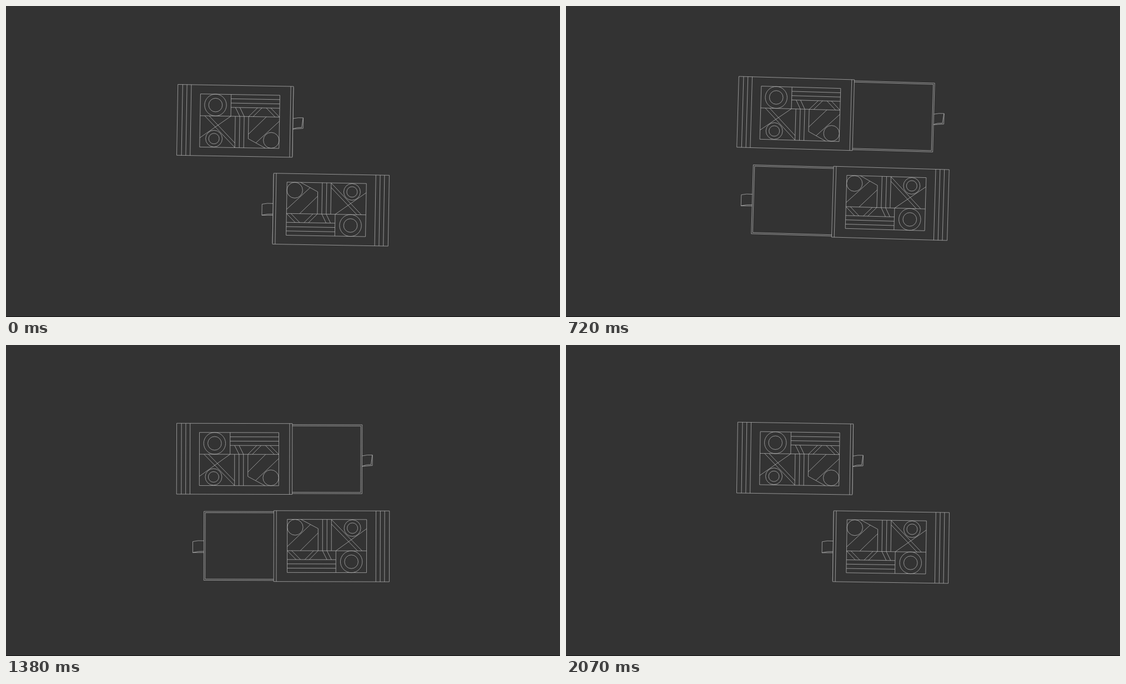
An HTML page with a canvas for the animation above (2100 ms loop, 998 px wide and 561 px high).

```html
<!DOCTYPE html>
<html lang="en">
<head>
<meta charset="utf-8">
<title>Sliding boxes</title>
<style>
  html, body { margin: 0; width: 100%; height: 100%; overflow: hidden; background: #333; }
  canvas { display: block; width: 998px; height: 561px; }
</style>
</head>
<body>
<canvas id="stage" width="998" height="561"></canvas>
<script>
const ctx = document.getElementById('stage').getContext('2d');
const LOOP = 2100, STEP = 30;
const BG = '#333333', INK = '#b6b6b6';
const BOX = { x: -191.8, y: -142.5, w: 208.3, h: 127.8 };
const TRAVEL = 154;

// Turning points of the sway (degrees) and of the float (centre height)
const SWAY = [[0, 1], [230, -0.5], [605, 2.9], [1010, -3.8], [1290, 1.5],
  [1500, -2], [1765, 3.6], [1990, 0.3], [LOOP, 1]];
const FLOAT = [[0, 287.3], [400, 287.9], [920, 268.8], [1440, 284.7], [LOOP, 284.6]];

// Half a cosine between neighbouring turning points
function wave(turns, t) {
  const i = turns.findIndex(turn => turn[0] > t);
  const [t0, a] = turns[i - 1], [t1, b] = turns[i];
  return a + (b - a) * (1 - Math.cos(Math.PI * (t - t0) / (t1 - t0))) / 2;
}

// Cubic ease with handles (x1, 0) and (x2, 1)
function ease(u, x1, x2) {
  if (u <= 0) return 0;
  if (u >= 1) return 1;
  let lo = 0, hi = 1;
  for (let i = 0; i < 24; i++) {
    const s = (lo + hi) / 2, r = 1 - s;
    const x = 3 * r * r * s * x1 + 3 * r * s * s * x2 + s * s * s;
    if (x < u) lo = s; else hi = s;
  }
  return lo * lo * (3 - 2 * lo);
}

function drawerAt(t) {
  return t < 1125
    ? TRAVEL * ease(t / 1050, 0.1, 0.2)
    : TRAVEL * (1 - ease((t - 1125) / 525, 0.85, 0.6));
}

function line(...p) {
  ctx.beginPath();
  for (let i = 0; i < p.length; i += 2) ctx.lineTo(p[i], p[i + 1]);
  ctx.stroke();
}

function ring(x, y, ...radii) {
  for (const r of radii) {
    ctx.beginPath();
    ctx.arc(x, y, r, 0, Math.PI * 2);
    ctx.stroke();
  }
}

function bend(x0, y0, cx, cy, x1, y1) {
  ctx.beginPath();
  ctx.moveTo(x0, y0);
  ctx.quadraticCurveTo(cx, cy, x1, y1);
  ctx.stroke();
}

function panel() {
  const w = 143, h = 95.8, mid = 39.3, low = 23.3;
  ctx.strokeRect(0, 0, w, h);
  line(0, mid, w, mid);
  line(55.3, 0, 55.3, mid);
  for (let i = 1; i <= 3; i++) line(55.3, low * i / 3, w, low * i / 3);
  ring(27.4, 19.6, 19.7, 12.3);

  for (const d of [0, 8]) {
    line(63.4 + d, low, 71.4 + d, mid, 71.4 + d, h);
    line(87.4 + d, mid, 103.2 + d, low);
    line(119 + d, low, 135 + d, mid);
    line(8.2 + d, mid, 63.4, 95.5 - d);
  }
  line(63.4, mid, 63.4, h);
  line(55.3, mid, 0, 79.2);
  ring(25.6, 80.2, 15, 9.5);

  line(87.4, mid, 87.4, 79.3, 118.5, h);
  line(87.4, 71.3, 119.4, mid);
  line(101.2, 86.6, w, 46.7);
  ring(128.8, 81.5, 14.2);
}

function ribbon(flipped) {
  if (flipped) {
    bend(0, 73.2, 11, 74.2, 20, 71.7);
    line(20, 71.7, 20, 51.7, 0, 52);
    bend(20, 52, 10, 54.6, 0, 54.2);
  } else {
    bend(0, 58, 9, 55.6, 18.6, 56.3);
    line(18.6, 56.3, 18.5, 75.3, 0, 77);
    line(18.2, 56.6, 16, 73.8);
    bend(0, 76.5, 8, 73.2, 16, 73.8);
  }
}

function box(open, flipped) {
  const { w, h } = BOX, edge = w + open;
  ctx.save();
  if (flipped) ctx.rotate(Math.PI);
  ctx.translate(BOX.x, BOX.y);

  ctx.save();
  ctx.translate(edge, 0);
  ribbon(flipped);
  ctx.restore();
  ctx.strokeRect(edge - 170, 1.9, 170, 124.3);
  ctx.strokeRect(edge - 170, 4.2, 167.6, 119.7);

  ctx.fillStyle = BG;
  ctx.fillRect(0, 0, w, h);
  ctx.strokeRect(0, 0, w, h);
  for (const x of [8.6, 16.4, 24.2, w - 4.8]) line(x, 0, x, h);

  ctx.translate(41, 16.4);
  panel();
  ctx.restore();
}

function draw(t) {
  ctx.fillStyle = BG;
  ctx.fillRect(0, 0, 998, 561);
  ctx.fillStyle = '#141414';
  ctx.fillRect(0, 560, 998, 1);

  ctx.save();
  ctx.translate(499, wave(FLOAT, t));
  ctx.rotate(wave(SWAY, t) * Math.PI / 180);
  ctx.strokeStyle = INK;
  ctx.lineWidth = 0.75;
  const open = drawerAt(t);
  box(open, false);
  box(open, true);
  ctx.restore();
}

function tick() {
  const t = performance.now() % LOOP;
  draw(Math.floor(t / STEP) * STEP);
  requestAnimationFrame(tick);
}
tick();
</script>
</body>
</html>
```
